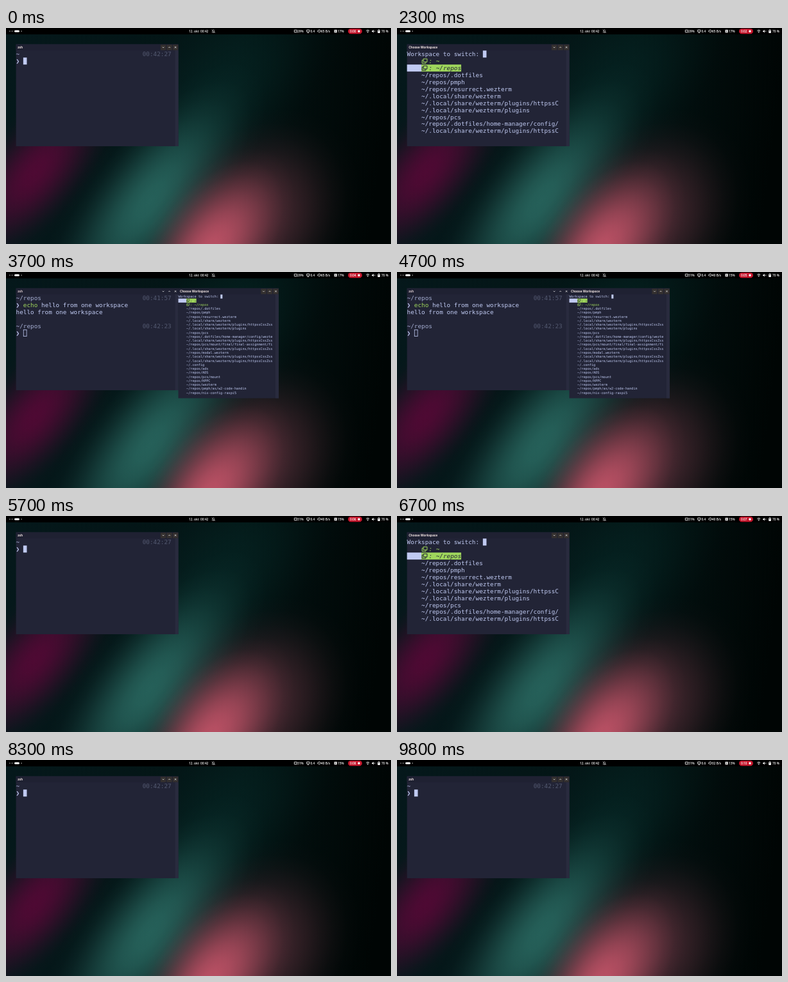
Animation of 600x338 px, one loop 9900 ms. Source, as an HTML page with a canvas:

```html
<!DOCTYPE html>
<html>
<head>
<meta charset="utf-8">
<style>
html, body { margin: 0; width: 100%; height: 100%; overflow: hidden; background: #000 }
canvas { display: block; width: 600px; height: 338px }
</style>
</head>
<body>
<canvas id="stage" width="600" height="338"></canvas>
<script>
const g = document.getElementById('stage').getContext('2d');
const LOOP = 9900, STEP = 100;
const UI = '"Open Sans", "Noto Sans", sans-serif';
const MONO = '"DejaVu Sans Mono", "Noto Sans Mono", monospace';
const INK = '#c0caf2', LIME = '#9fd65c', NIGHT = '#222436', MUTED = '#a3acd0', DIM = '#535970';

const PLUGIN = '~/.local/share/wezterm/plugins/httpssCssZss';
const ITEMS = [
  '~/repos/.dotfiles', '~/repos/pmph', '~/repos/resurrect.wezterm', '~/.local/share/wezterm',
  PLUGIN, '~/.local/share/wezterm/plugins', '~/repos/pcs',
  '~/repos/.dotfiles/home-manager/config/wezte', PLUGIN,
  '~/repos/pcs/mount/final/final-assignment/fi', PLUGIN, '~/repos/modal.wezterm',
  PLUGIN, PLUGIN, '~/.config', '~/repos/ads', '~/repos/ADS', '~/repos/pcs/mount',
  '~/repos/HPPC', '~/repos/wezterm', '~/repos/pmph/as/w2-code-handin', '~/repos/nix-config-raspi5'
];

// Which view is up from each moment on; sel is the chosen menu row.
const VIEWS = [
  [0, 'home'], [1200, 'home', 0], [1800, 'home', 1],
  [2400, 'repos'], [3400, 'repos', 0],
  [4800, 'home'], [5800, 'home', 0], [6600, 'home', 1],
  [6900, 'repos'], [7500, 'repos', 0], [8200, 'home']
];

function rect(x, y, w, h, color) {
  g.fillStyle = color;
  g.fillRect(x, y, w, h);
}

function disc(x, y, r, color) {
  g.fillStyle = color;
  g.beginPath();
  g.arc(x, y, r, 0, 7);
  g.fill();
}

function pill(x, y, w, h, color) {
  g.fillStyle = color;
  g.beginPath();
  g.roundRect(x, y, w, h, h / 2);
  g.fill();
}

function line(path, color = '#fff', width = 0.8) {
  g.strokeStyle = color;
  g.lineWidth = width;
  g.stroke(new Path2D(path));
}

function label(str, x, y, color = '#f4f4f4', weight = 600) {
  g.font = `${weight} 4.8px ${UI}`;
  g.fillStyle = color;
  g.fillText(str, x, y);
}

// Soft rotated ellipse of light
function glow(x, y, rx, ry, deg, rgb, alpha) {
  g.save();
  g.translate(x, y);
  g.rotate(deg * Math.PI / 180);
  g.scale(rx, ry);
  const grad = g.createRadialGradient(0, 0, 0, 0, 0, 1);
  for (let i = 0; i <= 8; i++) {
    const a = alpha * (1 + Math.cos(Math.PI * i / 8)) / 2;
    grad.addColorStop(i / 8, `rgba(${rgb},${a})`);
  }
  g.fillStyle = grad;
  g.fillRect(-1, -1, 2, 2);
  g.restore();
}

function wallpaper() {
  const base = g.createLinearGradient(0, 0, 600, 80);
  base.addColorStop(0, '#05181b');
  base.addColorStop(0.6, '#031414');
  base.addColorStop(1, '#000504');
  g.fillStyle = base;
  g.fillRect(0, 0, 600, 338);
  glow(340, 90, 230, 130, -45, '6,42,40', 0.55);
  glow(45, 225, 190, 85, -50, '86,8,54', 0.9);
  glow(225, 270, 260, 105, -52, '42,106,98', 0.88);
  glow(385, 300, 190, 150, -50, '98,50,62', 0.75);
  glow(315, 350, 185, 100, -55, '208,88,110', 0.85);
}

function statusBar(t) {
  rect(0, 0, 600, 10, '#000');
  disc(6, 5, 0.8, '#bbb');
  disc(9.5, 5, 0.8, '#bbb');
  pill(13, 3.5, 8, 3, '#fff');
  disc(24, 5, 0.8, '#bbb');
  label('12. okt  00:42', 285, 6.8);
  line('M321 6.5h4.4l-.7-1V4.3a1.5 1.5 0 0 0-3 0v1.2zM322.6 7.6h1.2M320.6 2.6l5 5', '#ddd', 0.6);

  const stats = t < 4200 ? ['29%', '0.4', '65 B/s', '17%']
    : t < 9200 ? ['31%', '0.4', '40 B/s', '15%'] : ['31%', '0.6', '32 B/s', '13%'];
  [454, 474.5, 491, 517].forEach((x, i) => label(stats[i], x, 6.8));
  line('M449.3 3.2h4v3.4h-4z');
  line('M468.7 3h4.2v3h-4.2zM469.6 7.4h2.4');
  line('M486.8 6.2a1.2 1.2 0 0 1 0-2.4a1.5 1.5 0 0 1 2.8 0a1.2 1.2 0 0 1 0 2.4M488.2 4.6v3');
  rect(511.5, 2.8, 4.4, 4.4, '#eee');
  line('M512.6 3.8l2.2 2.4m0-2.4l-2.2 2.4', '#222', 0.6);

  pill(533, 1, 22, 8.3, '#c4162c');
  label('0:' + String(Math.floor((t + 300) / 1000)).padStart(2, '0'), 536, 6.8, '#fff');
  disc(550, 5.1, 1.8, '#fff');

  line('M561.3 4.2q2.5-2.2 5 0M562.3 5.4q1.5-1.3 3 0');
  disc(563.8, 6.8, 0.8, '#fff');
  g.fillStyle = '#fff';
  g.fill(new Path2D('M570.3 4.2h1l1.5-1.4v4.6l-1.5-1.4h-1z'));
  line('M573.6 4.2l1.6 1.8m0-1.8l-1.6 1.8', '#ccc', 0.6);
  line('M579.7 3.4h2.8v4h-2.8zM580.5 2.7h1.2');
  rect(579.6, 4.7, 3, 2.8, '#fff');
  label('70 %', 585, 6.8);
}

// Terminal frame; returns cell-based drawing helpers
function terminal(x, w, bottom, title, cw, rh, focused) {
  const top = 25.5, y0 = 35.3, right = x + w;
  rect(x, top, w, bottom - top, NIGHT);
  rect(x, top, w, 9.6, '#1f2132');
  rect(right - 5, 35, 5, bottom - 35, '#292b3e');
  label(title, x + 2.6, 31.6, focused ? '#f1e4e2' : '#d9c8cc', 700);
  [23.5, 14, 4.5].forEach((d, i) => {
    const cx = right - d, cy = 30.3;
    if (focused) rect(cx - 4.2, top + 0.6, 8.4, 8.6, '#34302f');
    line([`M${cx - 1.3} ${cy - 0.6}l1.3 1.3l1.3-1.3`, `M${cx - 1.3} ${cy + 0.7}l1.3-1.3l1.3 1.3`,
      `M${cx - 1.2} ${cy - 1.2}l2.4 2.4m0-2.4l-2.4 2.4`][i], '#e6e6e6', 0.8);
  });
  const at = (col, row) => [x + col * cw, y0 + row * rh];
  return {
    text(col, row, str, color = INK, style = '') {
      const [px, py] = at(col, row);
      g.font = `${style} ${cw / 0.602}px ${MONO}`;
      g.fillStyle = color;
      g.fillText(str, px, py + rh * 0.79);
    },
    fill(col, row, n, color) {
      const [px, py] = at(col, row);
      rect(px, py, n * cw, rh, color);
    },
    box(col, row) {
      const [px, py] = at(col, row);
      g.strokeStyle = INK;
      g.lineWidth = 0.8;
      g.strokeRect(px + 0.4, py + 0.4, cw - 0.8, rh - 0.8);
    },
    icon(col, row, color) {
      const [px, py] = at(col, row), s = cw / 5.63;
      g.save();
      g.translate(px, py);
      g.scale(s, s);
      line('M3 2h5.8v4.8H3zM3 4H1v5h5.8V6.8', color, 1);
      g.restore();
    }
  };
}

const home = (title, focused = true) => terminal(15.6, 253, 185, title, 5.63, 10.95, focused);
const side = title => terminal(268.5, 156.5, 197.5, title, 3.13, 6.27, true);

function menu(term, sel, count, cols) {
  term.text(0, 0, 'Workspace to switch:');
  term.fill(21, 0, 1, INK);
  ['~', '~/repos'].forEach((path, i) => {
    const on = i === sel, color = on ? NIGHT : LIME;
    if (on) {
      term.fill(0, i + 1, 4, INK);
      term.fill(4, i + 1, 4 + path.length, LIME);
    }
    term.icon(4, i + 1, color);
    term.text(6, i + 1, ': ' + path, color, 'italic');
  });
  ITEMS.slice(0, count).forEach((s, i) => term.text(4, i + 3, s.slice(0, cols)));
}

function prompt(term, row, path, time) {
  term.text(0, row, path, MUTED);
  if (time) term.text(35, row, time, DIM);
  term.text(0, row + 1, '❯', INK);
}

function homeView(sel) {
  const open = sel !== undefined;
  const term = home(open ? 'Choose Workspace' : 'zsh');
  if (open) return menu(term, sel, 9, 38);
  prompt(term, 0, '~', '00:42:27');
  term.fill(2, 1, 1, INK);
}

function reposView(sel, alpha) {
  const term = home('zsh', false);
  prompt(term, 0, '~/repos', '00:41:57');
  term.text(2, 1, 'echo', LIME);
  term.text(7, 1, 'hello from one workspace');
  term.text(0, 2, 'hello from one workspace');
  prompt(term, 4, '~/repos', '00:42:23');
  term.box(2, 5);

  const open = sel !== undefined;
  g.globalAlpha = alpha;
  const pane = side(open ? 'Choose Workspace' : 'zsh');
  if (open) {
    menu(pane, sel, ITEMS.length, 43);
  } else {
    prompt(pane, 0, '~/repos');
    pane.fill(2, 1, 1, INK);
  }
  g.globalAlpha = 1;
}

function draw(t) {
  const [since, name, sel] = VIEWS.findLast(v => v[0] <= t);
  wallpaper();
  statusBar(t);
  if (name === 'home') homeView(sel);
  else reposView(sel, sel === undefined ? Math.min(1, (t - since + 100) / 200) : 1);
}

let shown = -1;
const start = performance.now();
function tick() {
  const t = Math.floor((performance.now() - start) % LOOP / STEP) * STEP;
  if (t !== shown) draw(shown = t);
  requestAnimationFrame(tick);
}
tick();
</script>
</body>
</html>
```
